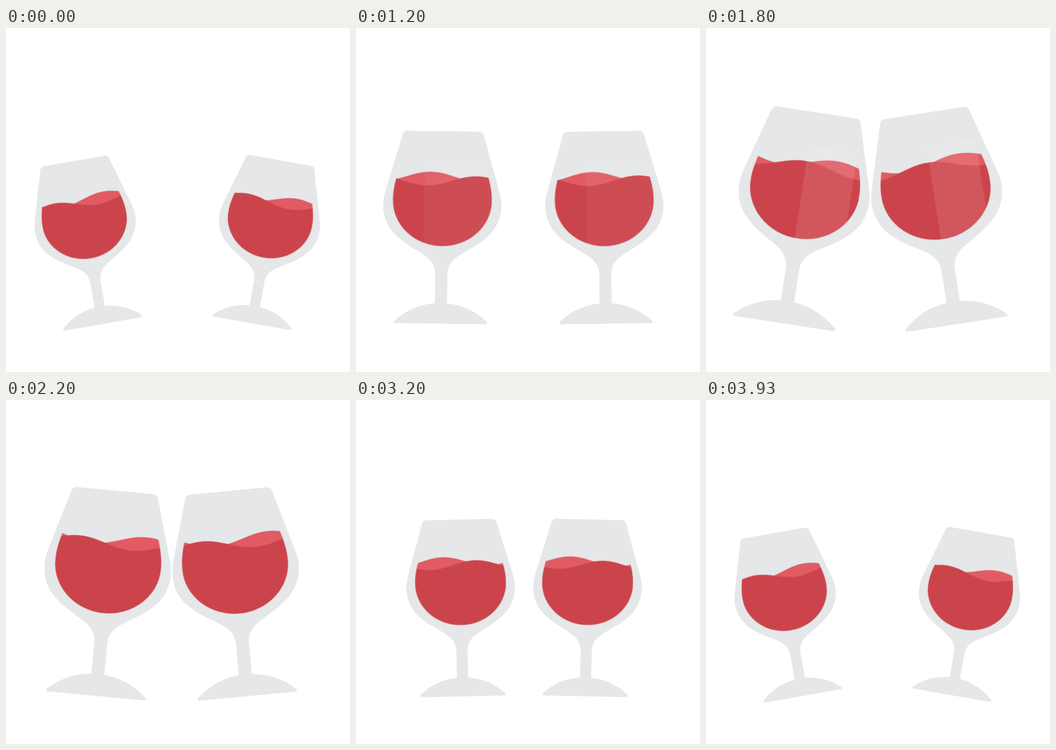
Recreate the animation shown at these times as an HTML page. Size 748x748 px, loop 4 s.

```html
<!DOCTYPE html>
<html lang="en">
<head>
<meta charset="utf-8">
<title>Cheers</title>
<style>
html, body { margin: 0; width: 100%; height: 100%; overflow: hidden; background: #fff; }
svg { display: block; width: 100%; height: 100%; }

/* the origin of a glass is the middle of its foot */
.glass, .size, .wave, .shine, .spark { animation: 4s linear infinite; }
#left { animation-name: left; }
#right { animation-name: right; }
.size { animation-name: size; }
.front { fill: #cc444b; animation-name: front; }
.back { fill: #e05c62; animation-name: back; }
.shine { fill: #fff; animation-name: shine; }
.spark {
  fill: none; stroke: #e4eaff; stroke-width: 22.5; stroke-linecap: round;
  animation-name: spark;
}

/* (1/3,0,2/3,0) is t cubed, (1/3,0,2/3,1) is smoothstep */
@keyframes left {
  0% { transform: translate(210.5px, 643.5px) rotate(-10deg); animation-timing-function: cubic-bezier(.3333, 0, .6667, 0); }
  36.75% { transform: translate(162px, 642.5px) rotate(9.8deg); }
  37.5% { transform: translate(162px, 642.5px) rotate(9.8deg); animation-timing-function: cubic-bezier(.3333, 0, .6667, 1); }
  75% { transform: translate(235.5px, 644.5px) rotate(0deg); animation-timing-function: cubic-bezier(.3333, 0, .6667, 1); }
  98.25%, 100% { transform: translate(210.5px, 643.5px) rotate(-10deg); }
}
@keyframes right {
  0% { transform: translate(534.5px, 642px) rotate(10deg); animation-timing-function: cubic-bezier(.3333, 0, .6667, 0); }
  36.75% { transform: translate(551px, 644px) rotate(-9.8deg); }
  37.5% { transform: translate(551px, 644px) rotate(-9.8deg); animation-timing-function: cubic-bezier(.3333, 0, .6667, 1); }
  75% { transform: translate(493.5px, 644.5px) rotate(0deg); animation-timing-function: cubic-bezier(.3333, 0, .6667, 1); }
  98.25%, 100% { transform: translate(534.5px, 642px) rotate(10deg); }
}
@keyframes size {
  0% { transform: scale(.873); animation-timing-function: cubic-bezier(.3333, 0, .6667, 0); }
  36.75% { transform: scale(1.135); }
  39% { transform: scale(1.135); animation-timing-function: cubic-bezier(.3333, 0, .6667, 1); }
  98.5%, 100% { transform: scale(.873); }
}

/* the two surfaces drift in opposite directions, two wavelengths per loop */
@keyframes front {
  0% { transform: translateX(40px); }
  21.75% { transform: translateX(9px); }
  36.75% { transform: translateX(-68px); }
  55% { transform: translateX(-168px); }
  70% { transform: translateX(-185px); }
  80% { transform: translateX(-282px); }
  98.25%, 100% { transform: translateX(-384px); }
}
@keyframes back {
  0% { transform: translate(-48px, -8.5px); }
  21.75% { transform: translate(5px, -8.5px); }
  36.75% { transform: translate(142px, -8.5px); }
  55% { transform: translate(178px, -8.5px); }
  70% { transform: translate(239px, -8.5px); }
  80% { transform: translate(278px, -8.5px); }
  98.25%, 100% { transform: translate(376px, -8.5px); }
}
@keyframes shine {
  0%, 12.5% { transform: translateX(-313px); }
  55%, 100% { transform: translateX(236px); }
}

/* each line grows outwards, then its tail catches up */
@keyframes spark {
  0%, 34.9% { opacity: 0; stroke-dasharray: 0 200; stroke-dashoffset: 0; }
  35% { opacity: 1; stroke-dasharray: 0 200; stroke-dashoffset: 0; }
  36.75% { opacity: 1; stroke-dasharray: 60 200; stroke-dashoffset: 0; }
  40% { opacity: 1; stroke-dasharray: 100 200; stroke-dashoffset: 0; }
  44.9% { opacity: 1; stroke-dasharray: 1 200; stroke-dashoffset: -99; }
  45%, 100% { opacity: 0; stroke-dasharray: 1 200; stroke-dashoffset: -99; }
}
</style>
</head>
<body>
<svg viewBox="0 0 748 748">
  <defs>
    <clipPath id="bowl">
      <path d="M-87 -347L-93 -330C-101 -306 -106 -285 -106 -264A106 98 0 0 0 106 -264C106 -285 101 -306 93 -330L87 -347Z"/>
    </clipPath>
    <path id="wave" d="M-530 -316.5
      c38.6 0 67.4 21 106 21s67.4 -21 106 -21s67.4 21 106 21s67.4 -21 106 -21
      s67.4 21 106 21s67.4 -21 106 -21s67.4 21 106 21s67.4 -21 106 -21
      s67.4 21 106 21s67.4 -21 106 -21V-150H-530Z"/>
  </defs>

  <path class="spark" pathLength="100" d="M136 141L111 101"/>
  <path class="spark" pathLength="100" d="M285.5 111L273 64.3"/>
  <path class="spark" pathLength="100" d="M447.5 114L458 67"/>
  <path class="spark" pathLength="100" d="M575 142.5L603 103"/>

  <g id="left" class="glass">
    <g class="size">
      <path fill="#e5e7e8" d="M-95.5 0C-100 0 -101 -3 -98 -6A145 145 0 0 1 -13 -43.5V-105
        C-13 -130 -28 -141 -48 -153C-88 -177 -126.5 -200 -126.5 -254
        C-126.5 -269 -122 -283 -117 -300L-87 -404Q-84.500 -412 -77 -412
        H77Q84.500 -412 87 -404L117 -300C122 -283 126.5 -269 126.5 -254
        C126.5 -200 88 -177 48 -153C28 -141 13 -130 13 -105V-43.5
        A145 145 0 0 1 98 -6C101 -3 100 0 95.5 0Z"/>
      <g clip-path="url(#bowl)">
        <g class="wave back"><use href="#wave"/></g>
        <g class="wave front"><use href="#wave"/></g>
        <g class="shine">
          <rect x="-112" y="-350" width="95" height="190" opacity=".1"/>
          <rect x="48" y="-350" width="160" height="190" opacity=".05"/>
        </g>
      </g>
    </g>
  </g>
  <g id="right" class="glass"></g>
</svg>
<script>
const pick = id => document.getElementById(id);
pick('right').append(pick('left').firstElementChild.cloneNode(true));
</script>
</body>
</html>
```
